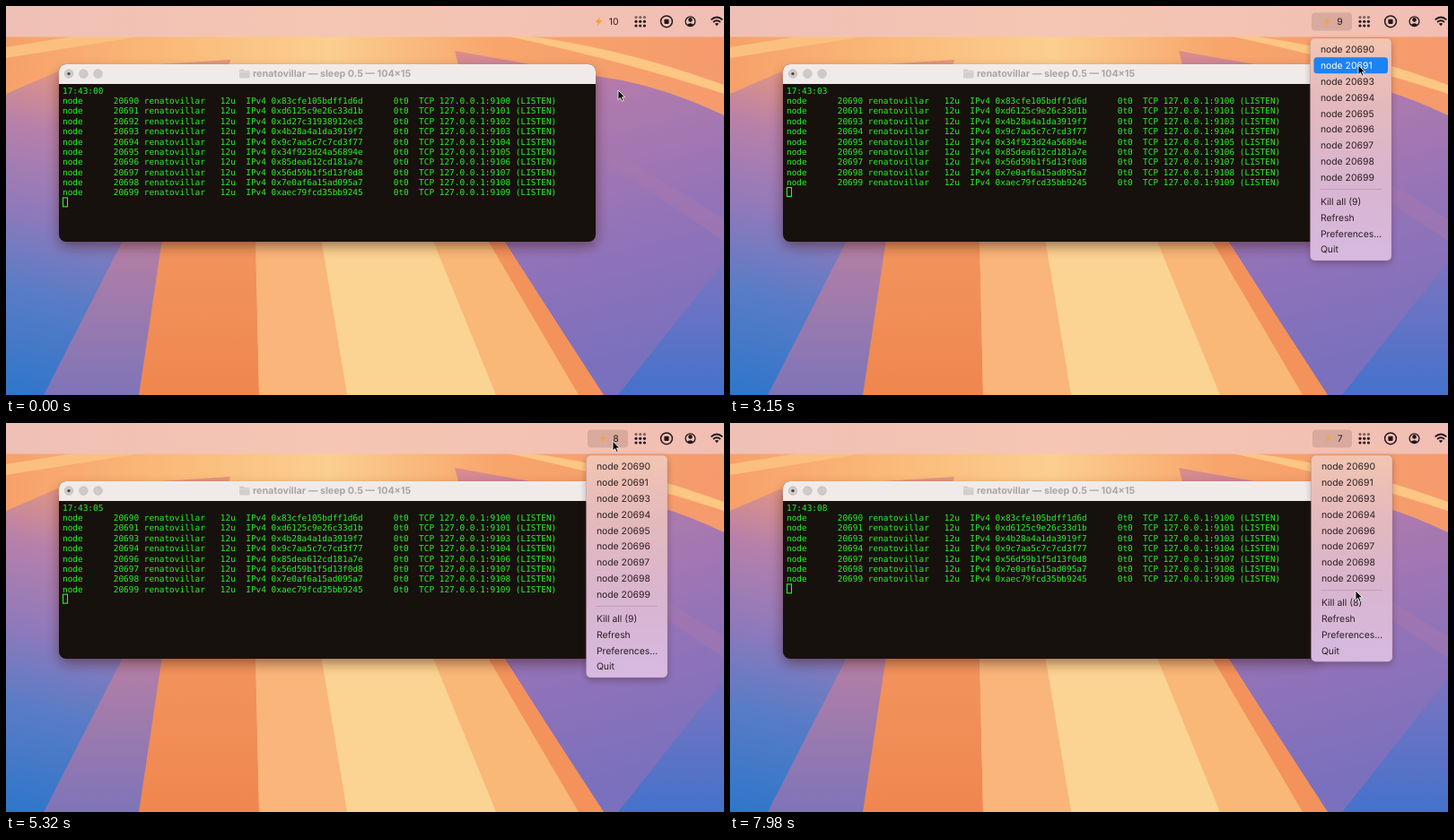
Animation, 800 px wide and 434 px high, one loop 8000 ms. Source, as an HTML page:

```html
<!DOCTYPE html>
<html lang="en">
<head>
<meta charset="utf-8">
<title>Process menu</title>
<style>
html, body { margin: 0; width: 100%; height: 100%; overflow: hidden; background: #f5b07c; }
svg { display: block; width: 800px; height: 434px; }
text { white-space: pre; text-rendering: geometricPrecision; }
.term text { font: 9.43px "DejaVu Sans Mono", monospace; fill: #2cf02e; }
.ui { font: 10.4px Inter, sans-serif; fill: #2b1f22; }
.title { font: 700 10.7px Inter, sans-serif; fill: #aaa6a4; }
</style>
</head>
<body>
<svg viewBox="0 0 800 434" xmlns="http://www.w3.org/2000/svg">
  <defs>
    <linearGradient id="sky" x1="0" x2="1" y1="0" y2="0">
      <stop offset="0" stop-color="#f7a06a"/><stop offset=".22" stop-color="#fab979"/>
      <stop offset=".45" stop-color="#fbcf8f"/><stop offset=".68" stop-color="#f8a56c"/>
      <stop offset="1" stop-color="#f59a6c"/>
    </linearGradient>
    <linearGradient id="left" x1=".15" x2="0" y1="0" y2="1">
      <stop offset="0" stop-color="#e5977f"/><stop offset=".2" stop-color="#b780aa"/>
      <stop offset=".45" stop-color="#8f79bb"/><stop offset=".68" stop-color="#5a7cc6"/>
      <stop offset="1" stop-color="#2e76ca"/>
    </linearGradient>
    <linearGradient id="right" x1="0" x2=".2" y1="0" y2="1">
      <stop offset="0" stop-color="#dc8d8c"/><stop offset=".2" stop-color="#b37bab"/>
      <stop offset=".6" stop-color="#9473b8"/><stop offset="1" stop-color="#7a70bd"/>
    </linearGradient>
    <linearGradient id="mauve" x1="0" x2="0" y1="0" y2="1">
      <stop offset="0" stop-color="#b57fa4"/><stop offset="1" stop-color="#7f74b8"/>
    </linearGradient>
    <linearGradient id="blue" x1="0" x2="0" y1="0" y2="1">
      <stop offset="0" stop-color="#7d74c0"/><stop offset="1" stop-color="#4472cb"/>
    </linearGradient>
    <linearGradient id="ember" x1="0" x2="0" y1="0" y2="1">
      <stop offset="0" stop-color="#f4a068"/><stop offset="1" stop-color="#f08650"/>
    </linearGradient>
    <linearGradient id="bar" x1="0" x2="1" y1="0" y2="0">
      <stop offset="0" stop-color="#efc0b5"/><stop offset=".45" stop-color="#f5c6b3"/>
      <stop offset="1" stop-color="#f2beb4"/>
    </linearGradient>
    <linearGradient id="glass" x1="0" x2="0" y1="0" y2="1">
      <stop offset="0" stop-color="#f2c5b1"/><stop offset=".3" stop-color="#e4b9bd"/>
      <stop offset=".65" stop-color="#d8b5d0"/><stop offset="1" stop-color="#d7b9e1"/>
    </linearGradient>
    <filter id="soft" x="-20%" y="-20%" width="140%" height="150%">
      <feGaussianBlur stdDeviation="7"/>
    </filter>
    <filter id="near" x="-20%" y="-20%" width="140%" height="140%">
      <feGaussianBlur stdDeviation="3.5"/>
    </filter>
  </defs>

  <!-- wallpaper -->
  <rect width="800" height="434" fill="url(#sky)"/>
  <path d="M0 98 L60 72 L250 60 L148 434 H0Z" fill="url(#left)"/>
  <path d="M0 58 L150 34 H75 L0 46Z" fill="#fbc07f"/>
  <path d="M130 262 L175 262 L148 434 H42Z" fill="url(#mauve)"/>
  <path d="M500 50 L657 78 Q730 88 800 122 V434 H665 L555 262Z" fill="url(#right)"/>
  <path d="M800 285 V434 H682Z" fill="url(#blue)"/>
  <path d="M657 150 L800 238 V262 L657 166Z" fill="#a878ae" opacity=".5"/>
  <path d="M585 34 Q690 48 800 88 V98 Q690 62 560 34Z" fill="#fcc683"/>
  <path d="M195 120 L275 120 L282 434 H148Z" fill="url(#ember)"/>
  <path d="M275 120 H330 L382 434 H282Z" fill="#f9b57a"/>
  <path d="M328 120 H420 L548 434 H380Z" fill="#fbd392"/>
  <path d="M418 120 H455 L640 434 H546Z" fill="#f9b878"/>
  <path d="M454 120 H462 L666 434 H638Z" fill="#f4925c"/>

  <!-- menu bar -->
  <rect width="800" height="34.5" fill="url(#bar)"/>
  <rect id="btn" y="7.5" height="20" rx="4" fill="#6e4a48" opacity=".2"/>
  <path id="bolt" d="M2 -5.5 L-4.5 1 H-.6 L-2 5.5 L4.5 -1.2 H.6Z" fill="#f9a02f"/>
  <text id="count" class="ui" x="682.6" y="20.8" text-anchor="end"></text>
  <g id="dots" fill="#20181a"></g>
  <g fill="none" stroke="#20181a" stroke-width="1.5">
    <circle cx="736" cy="17.3" r="6.4"/>
    <rect x="733.4" y="14.7" width="5.2" height="5.2" rx=".8" fill="#20181a" stroke="none"/>
    <circle cx="762.5" cy="17.3" r="5.4" stroke-width="1.3"/>
    <path d="M760.2 15.4 a2.3 2.3 0 1 0 4.6 0 a2.3 2.3 0 1 0 -4.6 0 M758.6 21 q3.9 -3.6 7.8 0 q-3.9 3.4 -7.8 0" fill="#20181a" stroke="none"/>
    <path d="M785.6 15.4 Q792 9.8 798.4 15.4" stroke-width="1.9"/>
    <path d="M788 18 Q792 14.6 796 18" stroke-width="1.8"/>
    <path d="M789.8 19.8 Q792 18 794.2 19.8 L792 22.2Z" fill="#20181a" stroke="none"/>
  </g>

  <!-- terminal window -->
  <rect x="59" y="72" width="598" height="196" rx="10" fill="#3a1510" opacity=".5" filter="url(#soft)"/>
  <rect x="59" y="65" width="598" height="198" rx="8" fill="#16110d"/>
  <path d="M59 87 V73 a8 8 0 0 1 8 -8 H649 a8 8 0 0 1 8 8 V87Z" fill="#f0ebe9"/>
  <g fill="#cfcac8" stroke="#bdb8b6" stroke-width=".6">
    <circle cx="70" cy="75.6" r="4.8"/><circle cx="86.4" cy="75.6" r="4.8"/><circle cx="102.6" cy="75.6" r="4.8"/>
  </g>
  <circle cx="70" cy="75.6" r="1.7" fill="#4a4544"/>
  <path d="M260 72 q0 -1.4 1.4 -1.4 h3 l1.3 1.3 h4.6 q1.3 0 1.3 1.3 v6 q0 1.3 -1.3 1.3 h-9 q-1.3 0 -1.3 -1.3Z" fill="#d3cecc"/>
  <path d="M260 73.6 h11.6" stroke="#e4dfdd" stroke-width=".8"/>
  <text id="title" class="title" x="275" y="79.3"></text>
  <g id="term" class="term"></g>
  <rect id="caret" x="63.5" width="5" height="10" fill="none" stroke="#2cf02e" stroke-width="1.1"/>

  <g id="menu"></g>
  <path id="mouse" d="M0 0 V10.6 L2.5 8.4 L4.2 12.2 L6 11.4 L4.4 7.7 H7.6Z" fill="#0c0808" stroke="#fff" stroke-width=".8" stroke-linejoin="round"/>
</svg>
<script>
const LOOP = 8000, USER = 'renatovillar', FIRST = 20690;
const ROW = 11.37, ITEM = 17.85, MENU_W = 90.5;
const hex = ['83cfe105bdff1d6d', 'd6125c9e26c33d1b', '1d27c31938912ec8', '4b28a4a1da3919f7',
  '9c7aa5c7c7cd3f77', '34f923d24a56894e', '85dea612cd181a7e', '56d59b1f5d13f0d8',
  '7e0af6a15ad095a7', 'aec79fcd35bb9245'];

const exits = [{ id: 2, at: 2600 }, { id: 5, at: 4250 }, { id: 6, at: 6900 }];
const counts = [[0, 10], [2560, 9], [4950, 8], [7200, 7]];
const menus = [
  { from: 820, to: 1900, gone: [] },
  { from: 2640, to: 3720, gone: [2] },
  { from: 4280, to: 6400, gone: [2] },
  { from: 7150, to: LOOP, gone: [2, 5] }
];
// time, x, y of the pointer
const path = [
  [0, 682, 94], [240, 682, 94], [720, 677, 23], [1120, 677, 23], [1600, 685, 84], [1900, 685, 84],
  [2240, 684.5, 72], [2560, 676, 20], [2740, 676, 20], [3150, 700, 66], [3480, 700, 119],
  [3720, 700, 119], [4180, 674, 17], [4350, 674, 17], [4620, 672, 2], [4900, 673, 10],
  [5300, 676, 20], [6090, 696, 143], [6400, 696, 139], [6950, 676, 20], [7200, 676, 20], [7980, 697, 187]
];

const $ = id => document.getElementById(id);
const set = (el, attrs) => { for (const k in attrs) el.setAttribute(k, attrs[k]); };
const alive = gone => hex.map((_, i) => i).filter(i => !gone.includes(i));

$('title').textContent = USER + ' — sleep 0.5 — 104×15';
for (let i = 0; i < 9; i++) {
  const dot = document.createElementNS('http://www.w3.org/2000/svg', 'circle');
  set(dot, { cx: 702 + i % 3 * 4.7, cy: 12.6 + (i / 3 | 0) * 4.7, r: 1.6, opacity: i < 3 ? .55 : 1 });
  $('dots').append(dot);
}

function pointer(t) {
  const i = path.findIndex(p => p[0] > t);
  if (i < 0) return path[path.length - 1].slice(1);
  const a = path[i - 1], b = path[i];
  const u = (t - a[0]) / (b[0] - a[0]), e = u * u * (3 - 2 * u);
  return [a[1] + (b[1] - a[1]) * e, a[2] + (b[2] - a[2]) * e];
}

function termLine(i) {
  return 'node      ' + (FIRST + i) + ' ' + USER + '   12u  IPv4 0x' + hex[i] +
    '      0t0  TCP 127.0.0.1:' + (9100 + i) + ' (LISTEN)';
}

function menuMarkup(menu, left, [mx, my]) {
  const ids = alive(menu.gone), n = ids.length;
  const labels = [...ids.map(i => 'node ' + (FIRST + i)), `Kill all (${n})`, 'Refresh', 'Preferences...', 'Quit'];
  const height = (n + 4) * ITEM + 16;
  const box = `x="${left}" width="${MENU_W}" height="${height}" rx="5"`;
  const sep = 48.4 + (n - .3) * ITEM + .8;
  let s = `<rect ${box} y="39" fill="#401820" opacity=".35" filter="url(#near)"/>
    <rect ${box} y="36" fill="url(#glass)" stroke="#a98a98" stroke-opacity=".5" stroke-width=".6"/>
    <path d="M${left + 11} ${sep} h${MENU_W - 22}" stroke="#5a3850" stroke-opacity=".2"/>`;
  labels.forEach((label, i) => {
    const y = 48.4 + i * ITEM + (i < n ? 0 : 9);
    const hot = Math.abs(my - y) < ITEM / 2 && mx > left && mx < left + MENU_W;
    if (hot) s += `<rect x="${left + 4}" y="${y - 8.9}" width="${MENU_W - 8}" height="17.8" rx="3.5" fill="#1c83f5"/>`;
    s += `<text class="ui" x="${left + 11.4}" y="${y + 3.8}"${hot ? ' style="fill:#fff"' : ''}>${label}</text>`;
  });
  return s;
}

const shown = {};
function fill(id, markup) {
  if (shown[id] !== markup) $(id).innerHTML = shown[id] = markup;
}

function draw(t) {
  const pos = pointer(t);
  const count = counts.filter(c => c[0] <= t).pop()[1];
  const left = count === 10 ? 643 : count === 7 ? 649 : 648;
  set($('btn'), { x: left, width: 693 - left, visibility: t < menus[0].from ? 'hidden' : 'visible' });
  $('count').textContent = count;

  const menu = menus.find(m => t >= m.from && t < m.to);
  set($('bolt'), { transform: `translate(${left + 17.3} 17.2) scale(.9)`, opacity: menu ? .75 : 1 });
  fill('menu', menu ? menuMarkup(menu, left - 1.5, pos) : '');

  const rows = alive(exits.filter(e => e.at <= t).map(e => e.id));
  const clock = '17:43:0' + Math.floor((t + 100) / 1000);
  fill('term', [clock, ...rows.map(termLine)]
    .map((line, i) => `<text x="63" y="${97.7 + i * ROW}">${line}</text>`).join(''));
  set($('caret'), { y: 100.2 + rows.length * ROW });
  set($('mouse'), { transform: `translate(${pos[0]} ${pos[1]})` });
}

function tick() {
  draw(performance.now() % LOOP);
  requestAnimationFrame(tick);
}
tick();
</script>
</body>
</html>
```
